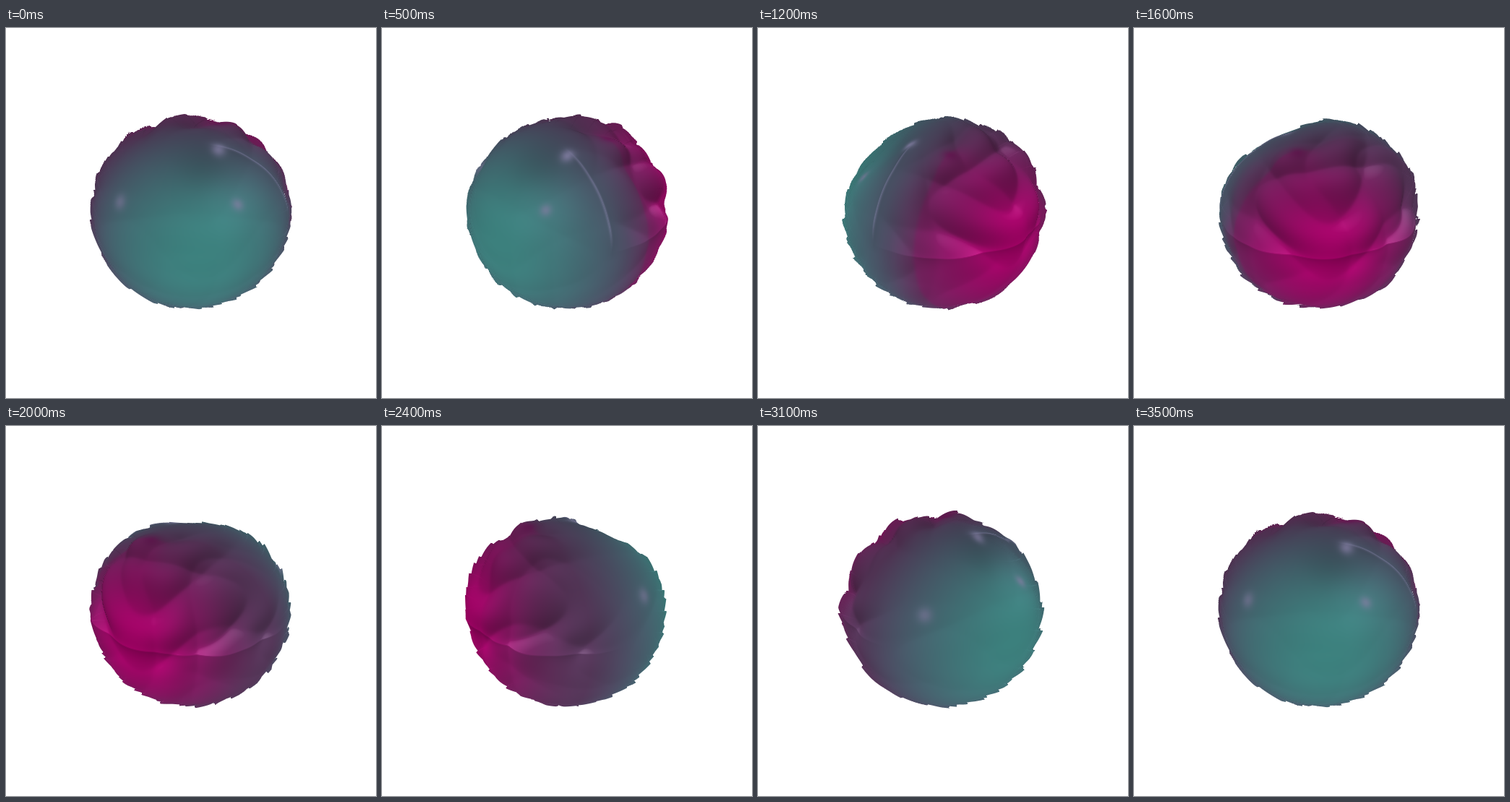
Write an HTML page with a canvas that moves like this. It is 512 px wide and 512 px high and loops after 3.6 s.

```html
<!DOCTYPE html>
<html>
<head>
<meta charset="utf-8">
<style>
html, body { margin: 0; width: 100%; height: 100%; overflow: hidden; background: #fff; }
canvas { display: block; width: 512px; height: 512px; }
</style>
</head>
<body>
<canvas id="stage" width="512" height="512"></canvas>
<script>
const ctx = document.getElementById('stage').getContext('2d');
const { sin, cos, abs, sqrt, max, min, exp, floor, PI } = Math;
const STEPS = 35, LOOP = 3600, R = 133, SIZE = 300, LEFT = 256 - SIZE / 2;
const RAD = PI / 180, C = cos(27 * RAD), S = sin(27 * RAD);
const clamp = (v, lo, hi) => min(hi, max(lo, v));
const ease = (lo, hi, v) => { const t = clamp((v - lo) / (hi - lo), 0, 1); return t * t * (3 - 2 * t); };
const saw = v => v - floor(v);
const pillow = v => sqrt(sin(v) ** 2 + 0.03);
const mix = (a, b, t) => a.map((v, i) => v + (b[i] - v) * t);

function direction(lon, lat) {
  const flat = cos(lat * RAD);
  return [flat * sin(lon * RAD), sin(lat * RAD), flat * cos(lon * RAD)];
}
function near([x, y, z], [px, py, pz], size) {
  return exp(-((x - px) ** 2 + (y - py) ** 2 + (z - pz) ** 2) / size ** 2);
}

const BASE = [80, 52, 84], TEAL = [58, 124, 121], PINK = [150, 2, 94];
const LAVENDER = [145, 139, 180], PLUM = [98, 22, 80], SLATE = [112, 112, 142];
const LIGHT = [-0.3, 0.75, 0.35];
const HOLLOW = direction(28, 47);
const SPOTS = [
  { at: direction(52, 67), size: 0.08, color: LAVENDER },
  { at: direction(134, 64), size: 0.08, color: PLUM },
  { at: direction(36, 28), size: 0.07, color: SLATE },
  { at: direction(307, 24), size: 0.08, color: SLATE },
];

// Distance to the surface: smooth pale side, pillowed bright side, ragged rim
function radius(p, viewZ) {
  const [x, y, z] = p;
  const bright = ease(0.25, -0.5, z);
  const pillows = pillow(5.5 * x + 1.6 * sin(4 * z + 0.6)) +
    pillow(5 * y + 1.4 * sin(4 * x + 1)) + pillow(5 * z + 1.5 * sin(5 * y + 2)) - 2;
  const ledge = exp(-abs(y) * 12) * 0.025 * bright;
  const seam = exp(-abs(z - 0.2) * 16) * 0.03 * ease(0.1, 0.5, x) * ease(-0.1, 0.3, y);
  const rags = saw(4 * y + 2.5 * x) + saw(4.5 * x - 3 * z) + saw(5 * z + 3 * y) - 1.5;
  return 1.02 - 0.05 * y * y - 0.13 * near(p, HOLLOW, 0.45) + ledge + seam +
    (0.004 + 0.04 * bright * ease(-0.4, 0.1, y) + 0.012 * bright) * pillows +
    0.026 * rags * exp(-12 * max(viewZ, 0));
}

function tint(p) {
  const [x, y, z] = p;
  const teal = clamp(0.2 + 0.8 * (0.1 * x + 0.995 * z), 0, 1);
  const pink = clamp(0.17 * x - 0.985 * z, 0, 1) ** 1.9;
  const flush = 0.2 * ease(-0.25, -0.31, z) * ease(0, 0.3, x) * (1 - pink);
  let rgb = mix(mix(BASE, TEAL, teal), PINK, pink + flush);
  const seam = exp(-(((z - 0.2) / 0.014) ** 2)) * ease(0.2, 0.5, x) * ease(0, 0.3, y);
  rgb = mix(rgb, LAVENDER, 0.35 * seam);
  for (const s of SPOTS) rgb = mix(rgb, s.color, 0.7 * near(p, s.at, s.size));
  return rgb;
}

function render(step) {
  const a = step * 2 * PI / STEPS, ca = cos(a), sa = sin(a);
  const img = ctx.createImageData(SIZE, SIZE);
  const depth = new Float32Array(SIZE * SIZE).fill(NaN);
  const cover = new Float32Array(SIZE * SIZE);
  const at = i => [(i % SIZE + 0.5 - SIZE / 2) / R, (SIZE / 2 - floor(i / SIZE) - 0.5) / R];

  // Unit direction in the turning body's own axes
  function toBody(x, u, z) {
    const l = sqrt(x * x + u * u + z * z), d = z * C - u * S;
    return [(x * ca + d * sa) / l, (u * C + z * S) / l, (d * ca - x * sa) / l];
  }

  for (let i = 0; i < depth.length; i++) {
    const [x, u] = at(i), q = x * x + u * u;
    if (q > 1.25) continue;
    let z = sqrt(1.26 - q), closest = 9, lastGap = 1, lastZ = z;
    for (let n = 0; n < 60 && z > -0.25; n++) {
      const gap = sqrt(q + z * z) - radius(toBody(x, u, z), z);
      if (gap < closest) { closest = gap; depth[i] = z; }
      if (gap <= 0) {
        depth[i] = lastZ + (z - lastZ) * lastGap / (lastGap - gap);
        break;
      }
      lastGap = gap;
      lastZ = z;
      z -= max(gap * 0.6, 0.006);
    }
    cover[i] = clamp(1 - closest * R, 0, 1);
    if (!cover[i]) depth[i] = NaN;
  }

  for (let i = 0; i < depth.length; i++) {
    if (!cover[i]) continue;
    const [x, u] = at(i), z = depth[i], l = sqrt(x * x + u * u + z * z);
    const sx = (depth[i - 1] - depth[i + 1]) * R / 2;
    const su = (depth[i + SIZE] - depth[i - SIZE]) * R / 2;
    const n = sqrt(sx * sx + su * su + 1);
    const tilt = (sx / n - x / l) * LIGHT[0] + (su / n - u / l) * LIGHT[1] + (1 / n - z / l) * LIGHT[2];
    const bend = clamp(tilt || 0, -0.45, 0.45) * clamp(z * 4, 0, 1);
    const shade = 1 - 0.08 * u + 0.55 * bend;
    const gloss = 130 * max(0, bend - 0.27);
    tint(toBody(x, u, z)).forEach((v, c) => img.data[4 * i + c] = v * shade + gloss);
    img.data[4 * i + 3] = 255 * cover[i];
  }
  return img;
}

const cache = [], start = performance.now();
let shown = -1;
function tick() {
  const step = floor((performance.now() - start) % LOOP / 100) % STEPS;
  if (step !== shown) {
    shown = step;
    cache[step] = cache[step] || render(step);
    ctx.putImageData(cache[step], LEFT, LEFT);
  }
  requestAnimationFrame(tick);
}
tick();
</script>
</body>
</html>
```
